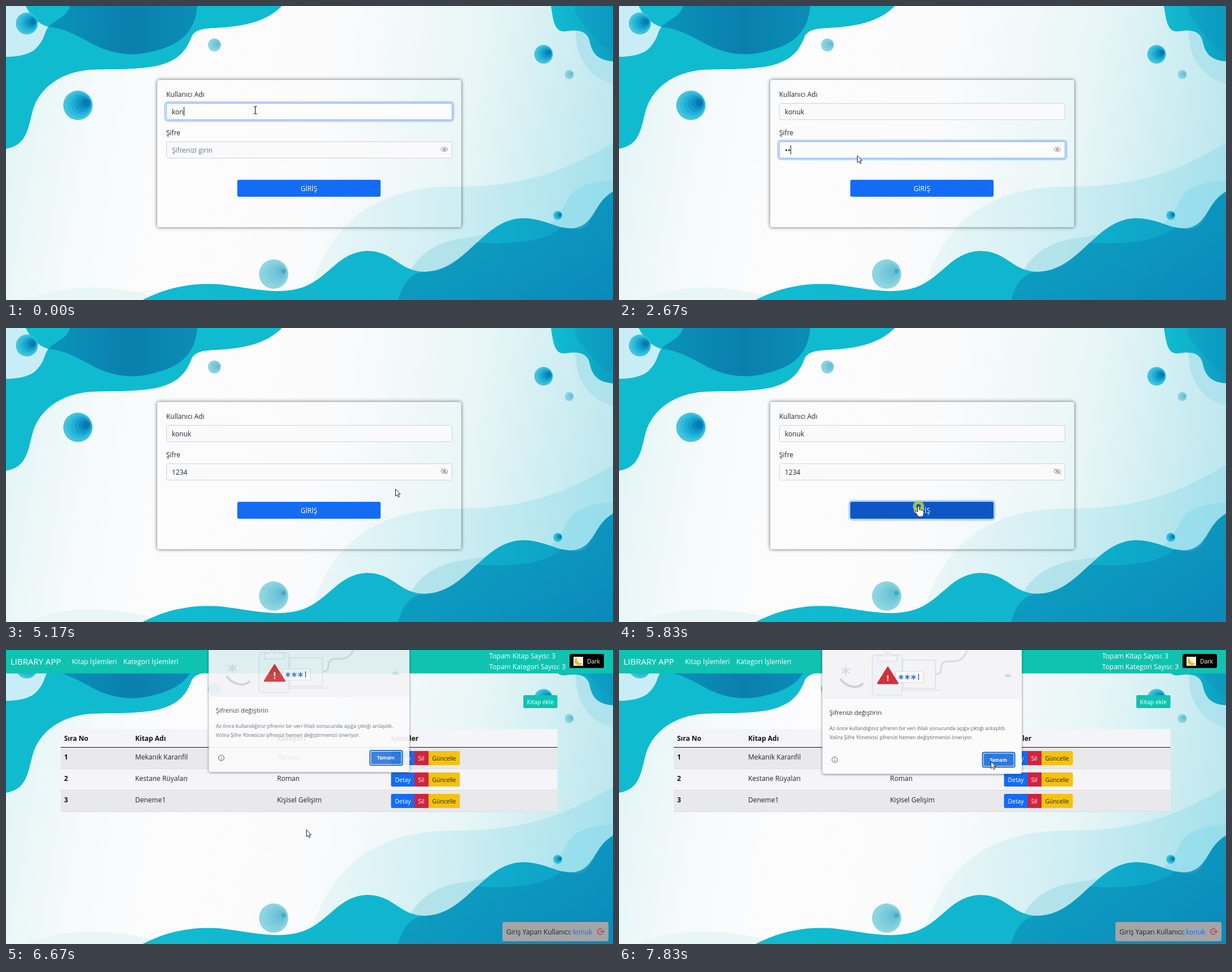
Write an HTML page that moves like this. It is 1076 px wide and 521 px high and loops after 8 s.

```html
<!DOCTYPE html>
<html lang="tr">
<head>
<meta charset="utf-8">
<title>Kitaplık girişi</title>
<style>
html, body { margin: 0; width: 100%; height: 100%; overflow: hidden; background: #fdfcfd; }
svg { position: absolute; left: 0; top: 0; width: 1076px; height: 521px; }
text { font: 12px "Open Sans", "Noto Sans", sans-serif; fill: #212529; white-space: pre; }
#card { position: absolute; left: 268px; top: 131px; width: 539px; height: 261px; border-radius: 4px;
  box-shadow: 0 0 6px rgba(0,0,0,.62); }
.field { fill: #fafafb; stroke: #ced2d8; }
.field.focus { fill: #fdfcfd; stroke: #86b7fe; }
.halo { fill: none; stroke: #0d6efd; stroke-opacity: .28; stroke-width: 3.4; }
.white { fill: #fff; }
.b { font-weight: 700; fill: #111; }
.s { font-size: 10.4px; }
#dialog { filter: drop-shadow(0 1px 2px rgba(0,0,0,.5)); }
.art { fill: none; stroke: #d9dbe0; stroke-width: 1.2; }
</style>
</head>
<body>
<svg viewBox="0 0 1076 521">
  <defs>
    <linearGradient id="sky" gradientUnits="userSpaceOnUse" x1="0" y1="220" x2="1076" y2="400">
      <stop offset="0" stop-color="#e3f5f6"/><stop offset=".14" stop-color="#f6fafb"/>
      <stop offset=".28" stop-color="#fdfcfd"/><stop offset=".5" stop-color="#fbfbfc"/>
      <stop offset=".74" stop-color="#e8f6f7"/><stop offset="1" stop-color="#b8e6ed"/>
    </linearGradient>
    <linearGradient id="sea" gradientUnits="userSpaceOnUse" x1="240" y1="440" x2="1076" y2="480">
      <stop offset="0" stop-color="#10bbd0"/><stop offset=".6" stop-color="#10b5ce"/><stop offset="1" stop-color="#0c9cc5"/>
    </linearGradient>
    <linearGradient id="deep" x1="0" y1="0" x2="1" y2="1">
      <stop offset="0" stop-color="#0ea3c2"/><stop offset="1" stop-color="#0a86b8"/>
    </linearGradient>
    <linearGradient id="haze" x1="0" y1="0" x2="1" y2="0">
      <stop offset="0" stop-color="#cdeef2" stop-opacity=".3"/><stop offset="1" stop-color="#9fdfeb" stop-opacity=".75"/>
    </linearGradient>
    <linearGradient id="dark" x1="0" y1="0" x2="1" y2="0">
      <stop offset="0" stop-color="#0a93bb"/><stop offset=".55" stop-color="#0a7fae"/><stop offset="1" stop-color="#0b8db6"/>
    </linearGradient>
    <linearGradient id="corner" x1="0" y1="0" x2="1" y2="0">
      <stop offset="0" stop-color="#10bbd0"/><stop offset=".4" stop-color="#10b2cb"/><stop offset="1" stop-color="#0d9ec2"/>
    </linearGradient>
  </defs>
  <path fill="url(#sky)" d="M0 0H1076V521H0Z"/>
  <path fill="#e6f5f5" opacity=".8" d="M35 521C90 497 170 490 262 513L250 521Z"/>
  <path fill="#10bbd0" d="M0 0H489C462 27 425 35 385 38C355 40 340 39 330 52C320 78 308 96 268 106C225 114 190 111 150 113C95 117 60 146 48 183C39 215 38 247 0 253Z"/>
  <path fill="#c9edf6" d="M0 0H35C45 20 58 32 75 37C67 47 70 60 50 78C36 88 16 90 0 90Z"/>
  <path fill="url(#dark)" d="M113 0C110 18 90 22 75 37C112 40 140 62 170 75C205 88 232 88 262 80C315 68 336 40 339 0Z"/>
  <path fill="#a8e0ec" opacity=".75" d="M1008 0C1008 35 1009 55 1014 78C1024 110 1046 130 1076 138V0Z"/>
  <path fill="url(#corner)" d="M966 0C970 25 972 46 990 45C1010 42 1028 42 1034 60C1038 80 1045 96 1076 98V0Z"/>
  <path fill="#0b8db8" opacity=".3" d="M1008 0C1010 22 1022 30 1036 48C1050 64 1060 78 1076 82V0Z"/>
  <path fill="url(#haze)" d="M535 521C560 420 620 322 790 320C900 320 970 305 1076 243V521Z"/>
  <path fill="#8ddcec" opacity=".62" d="M925 400C985 392 985 350 1005 330C1025 313 1050 311 1076 309V400Z"/>
  <path fill="#a3dde6" opacity=".65" d="M695 521C712 460 740 425 800 413C850 406 876 402 910 376L1000 400V521Z"/>
  <path fill="url(#sea)" d="M242 521C290 496 345 487 400 496C450 503 490 512 530 497C575 478 590 436 640 434C690 435 695 470 743 471C818 469 843 379 915 376C955 376 975 395 1010 396C1044 397 1036 352 1076 329V521Z"/>
  <path fill="url(#deep)" opacity=".85" d="M695 521C703 492 718 472 743 471C783 470 810 442 835 419C900 424 960 416 985 392C1044 404 1036 352 1076 329V521Z"/>
  <g id="bubbles"></g>
</svg>
<div id="card"></div>
<svg viewBox="0 0 1076 521">
  <g id="login">
    <text x="284" y="161">Kullanıcı Adı</text>
    <text x="284" y="229">Şifre</text>
    <rect class="halo" id="userHalo" x="282" y="170.5" width="511" height="33" rx="5"/>
    <rect class="field" id="userField" x="284.5" y="172.5" width="506" height="29" rx="3"/>
    <text id="user" x="294" y="192"></text>
    <rect class="halo" id="passHalo" x="282" y="238.5" width="511" height="33" rx="5"/>
    <rect class="field" id="passField" x="284.5" y="240.5" width="506" height="29" rx="3"/>
    <text id="pass" x="294" y="260"></text>
    <rect id="caret" width="1" height="16" fill="#111"/>
    <g transform="translate(777 254)" fill="none" stroke="#a5a5a9" stroke-width="1.2">
      <path d="M-6 0C-3-5 3-5 6 0C3 5-3 5-6 0Z"/><circle r="1.9" fill="#a5a5a9"/>
      <path id="slash" d="M-6-5L6 5"/>
    </g>
    <rect class="halo" id="btnHalo" x="408.5" y="306.5" width="257" height="33" rx="4"/>
    <rect id="btn" x="410" y="308" width="254" height="30" rx="3"/>
    <text class="white" x="537" y="328" text-anchor="middle">GİRİŞ</text>
  </g>
  <g id="app">
    <path fill="#10c3b0" d="M0 0H1076V41.5H0Z"/>
    <text class="white" x="8" y="26" style="font-size:15px">LIBRARY APP</text>
    <text class="white" x="117" y="25">Kitap İşlemleri</text>
    <text class="white" x="208" y="25">Kategori İşlemleri</text>
    <text class="white" x="856.5" y="15">Topam Kitap Sayısı: 3</text>
    <text class="white" x="856.5" y="34">Topam Kategori Sayısı: 3</text>
    <rect x="999" y="7" width="61" height="25" rx="3"/>
    <g id="moon"><rect x="1006" y="12" width="17" height="16" fill="#fdf6dc"/><path fill="#f4b92f" d="M1012 13A7.5 7.5 0 1 0 1022 23A8 8 0 0 1 1012 13Z"/></g>
    <text class="white s" x="1030" y="24">Dark</text>
    <rect x="917" y="80" width="60.5" height="23" rx="2.5" fill="#10c3b0"/>
    <text class="white s" x="923.5" y="95.5">Kitap ekle</text>
    <path fill="#f5f4f8" d="M97 140H977.5V286H97Z"/>
    <g id="rows"></g>
    <path d="M97 172.5H977.5" stroke="#111"/>
    <rect x="880" y="482" width="188" height="34" rx="3" fill="#a3a5a7"/>
    <text x="887" y="504">Giriş Yapan Kullanıcı:</text>
    <text x="1005" y="504" style="fill:#0d6efd">konuk</text>
    <path d="M1057 495.5A5 5 0 1 0 1057 502.5M1052 499H1060M1057.5 496.8L1060 499L1057.5 501.2" fill="none" stroke="#e03040" stroke-width="1.4"/>
  </g>
  <g id="dialog">
    <rect x="360.5" y="-8" width="353.5" height="227.5" rx="4" fill="#fbfbfc"/>
    <path fill="#f4f4f6" d="M360.5 0H714V87H360.5Z"/>
    <g class="art">
      <rect x="503" y="18" width="58" height="50"/><path d="M503 71.5H570"/>
      <rect x="449" y="9" width="53" height="71" rx="4" fill="#f1f2f5"/>
      <path fill="#f4f4f6" d="M459 20V10H469C470 1 482 1 483 10H493V20Z"/><circle cx="476" cy="8" r="2"/>
      <path d="M561 43C581 42 560 20 586 20C602 21 611 17 617 1" stroke-width="3"/>
      <path d="M392 51C404 66 422 70 433 59" stroke="#cfd1d7" stroke-width="4"/>
      <path d="M402 29V45M395 33L409 41M395 41L409 33" stroke-width="2.5"/>
      <path d="M683 48C684 40 695 40 696 48Z" fill="#d9dbe0" stroke="none"/>
      <rect x="490" y="38" width="50" height="19.5" rx="2" fill="#fbfbfc"/>
    </g>
    <g id="stars" stroke="#2c67cf" stroke-width="1.5"><path d="M531 42V53"/></g>
    <path d="M476.5 31L494 59H459Z" fill="#d23138" stroke="#d23138" stroke-width="3" stroke-linejoin="round"/>
    <text class="white" x="476.5" y="55" text-anchor="middle" style="font-size:15px;font-weight:700">!</text>
    <text x="373" y="114.5" style="font-size:11.2px;fill:#333">Şifrenizi değiştirin</text>
    <g id="notice"></g>
    <g fill="none" stroke="#55585e"><circle cx="382.5" cy="194.5" r="5"/><path d="M382.5 194V197.5M382.5 191.5V192.8"/></g>
    <rect x="644.5" y="181.5" width="57" height="26" rx="3" fill="#fff" stroke="#1c62c4" stroke-width="2"/>
    <rect x="646.5" y="183.5" width="53" height="22" rx="2" fill="#2f78dc"/>
    <text class="white" x="672.5" y="197.5" text-anchor="middle" style="font-size:8.4px;font-weight:700">Tamam</text>
  </g>
  <g id="mouse">
    <circle id="click" r="7" fill="none" stroke="#b6d03c" stroke-width="6" opacity=".88"/>
    <path id="arrow" fill="#fff" stroke="#222" d="M.5 .5V13L3.4 10.3L5.3 14.7L7.3 13.8L5.4 9.5H9Z"/>
    <path id="beam" fill="none" stroke="#222" stroke-width="1.2" d="M-3-6H-1L0-5L1-6H3M0-5V6M-3 7H-1L0 6L1 7H3"/>
    <path id="hand" fill="#fff" stroke="#222" stroke-linejoin="round" d="M-1.5 10V1.5C-1.5-.5 1.5-.5 1.5 1.5V6.5C2.5 5.3 4 5.5 4.2 7C5.3 6 6.5 6.5 6.7 7.8C8 7 9 8 9 9.5V13C9 15.5 7.5 16 7.5 18.5H-.5C-1 16-2.5 15.5-3.5 13.5C-4.5 11.5-7 9.5-5.3 8.3C-3.8 7.5-2.5 9-1.5 10Z"/>
  </g>
</svg>
<script>
const $ = id => document.getElementById(id);
const show = (id, on) => $(id).style.display = on ? "" : "none";
const add = (id, markup) => $(id).insertAdjacentHTML("beforeend", markup);

function bubble(x, y, r, pale) {
  for (let i = 0; i < 6; i++) {
    const k = 1 - i * .15, off = r * (1 - k) * .75;
    const color = pale ? `hsl(${188 + i} 58% ${72 - i * 2}%)` : `hsl(${189 + i * 2} ${66 + i * 5}% ${56 - i * 4}%)`;
    add("bubbles", `<circle cx="${x + off}" cy="${y - off * .3}" r="${r * k}" fill="${color}"/>`);
  }
}
bubble(37, 31, 19.5); bubble(127.5, 176, 26); bubble(953, 85.5, 16.5); bubble(978, 371, 8);
bubble(369.5, 69, 11.5, true); bubble(998.5, 121.5, 8, true); bubble(474.5, 475, 26, true);
add("bubbles", '<circle cx="492" cy="470" r="4" fill="#3a9fb8" opacity=".7"/>');

const columns = [103, 229, 480.5, 682.5];
const cells = (words, y, bold) => words.map((w, i) =>
  `<text class="${bold || !i ? "b" : ""}" x="${columns[i]}" y="${y}">${w}</text>`).join("");
add("rows", cells(["Sıra No", "Kitap Adı", "Kategori", "İşlemler"], 161, true));
[["Mekanik Karanfil", "Roman"], ["Kestane Rüyaları", "Roman"], ["Deneme1", "Kişisel Gelişim"]].forEach((book, i) => {
  const y = 173 + i * 38, top = y + 6, base = y + 22.5;
  add("rows", `<path fill="${i % 2 ? "#f5f4f8" : "#e9e8ea"}" d="M97 ${y}H977.5v37.5H97Z"/>
    <path stroke="#dcdbe0" d="M97 ${y + 37.5}H977.5"/>${cells([i + 1, ...book], y + 20.5)}
    <rect x="682.5" y="${top}" width="60" height="25" rx="2.5" fill="#146cf4"/>
    <rect x="742" y="${top}" width="62.5" height="25" rx="2.5" fill="#f5c20f"/>
    <path fill="#d02340" d="M724 ${top}h25v25h-25Z"/>
    <text class="s white" x="689.5" y="${base}">Detay</text><text class="s white" x="730.5" y="${base}">Sil</text>
    <text class="s" x="755.5" y="${base}">Güncelle</text>`);
});
["Az önce kullandığınız şifrenin bir veri ihlali sonucunda açığa çıktığı anlaşıldı.",
 "Volira Şifre Yöneticisi şifrenizi hemen değiştirmenizi öneriyor."].forEach((line, i) =>
  add("notice", `<text x="373" y="${142 + i * 15.7}" style="font-size:9px;fill:#5f6368">${line}</text>`));
[500, 511, 522].forEach(x => add("stars", `<path d="M${x} 43.5v9M${x - 4} 45.7l8 4.6M${x - 4} 50.3l8-4.6"/>`));

// Pointer stops: step, x, y, shape from that step on.
const stops = [[0, 442, 184, "beam"], [5, 442, 184, "beam"], [7, 430, 225, "arrow"], [8, 423, 258, "beam"],
  [9, 422, 264.5, "beam"], [12, 422, 264.5, "arrow"], [20, 422, 264.5, "beam"], [26, 777, 250, "hand"],
  [30, 777, 250, "hand"], [31, 690, 285, "arrow"], [32, 531, 316, "hand"], [36, 531, 316, "arrow"],
  [40, 532, 318, "arrow"], [41, 545, 284, "arrow"], [44, 640, 212, "arrow"], [46, 659, 197, "arrow"], [48, 659, 197, "arrow"]];
const clicks = [9, 29, 35];
const STEP = 1000 / 6;

function movePointer(n) {
  const i = stops.findLastIndex(s => s[0] <= n);
  const [a, x, y, shape] = stops[i], [b, x2, y2] = stops[i + 1];
  const k = (n - a) / (b - a);
  $("mouse").setAttribute("transform", `translate(${x + (x2 - x) * k} ${y + (y2 - y) * k})`);
  ["arrow", "beam", "hand"].forEach(s => show(s, s === shape));
  show("click", clicks.includes(n));
}

function drawLogin(n) {
  const inUser = n < 9, inPass = n >= 9 && n < 29, open = n >= 29;
  $("user").textContent = "konuk".slice(0, 3 + Math.min(n, 2));
  const typed = [14, 16, 18, 19].filter(s => n >= s).length;
  const pass = $("pass");
  pass.textContent = open ? "1234" : typed ? "•".repeat(typed) : "Şifrenizi girin";
  pass.style.fill = typed ? "" : "#70767c";
  pass.style.fontSize = typed && !open ? "13.5px" : "";
  [["user", inUser], ["pass", inPass]].forEach(([f, on]) => {
    show(f + "Halo", on);
    $(f + "Field").classList.toggle("focus", on);
  });
  const blink = n < 5 || (n >= 9 && n < 12) || (n >= 14 && n < 22) || (n >= 25 && n < 28);
  show("caret", blink && (inUser || inPass));
  const width = inUser ? $("user").getComputedTextLength() : typed ? pass.getComputedTextLength() : 0;
  $("caret").setAttribute("x", Math.round(294 + width));
  $("caret").setAttribute("y", inUser ? 179 : 247);
  show("slash", open);
  show("btnHalo", n >= 35);
  $("btn").setAttribute("fill", n >= 35 ? "#0f56c5" : n >= 32 ? "#0b5ed7" : "#146cf4");
}

let last = -1;
function frame() {
  const n = Math.floor(((performance.now() + 4) % 8000) / STEP);
  if (n !== last) {
    last = n;
    const inside = n >= 36, opening = n === 40;
    show("login", !inside);
    show("card", !inside);
    show("app", inside);
    show("moon", n >= 37);
    show("dialog", n >= 40);
    $("dialog").setAttribute("opacity", opening ? .91 : 1);
    $("dialog").setAttribute("transform", opening ? "translate(537 -4.5) scale(1.006) translate(-537 0)" : "");
    if (!inside) drawLogin(n);
    movePointer(n);
  }
  requestAnimationFrame(frame);
}
frame();
</script>
</body>
</html>
```
